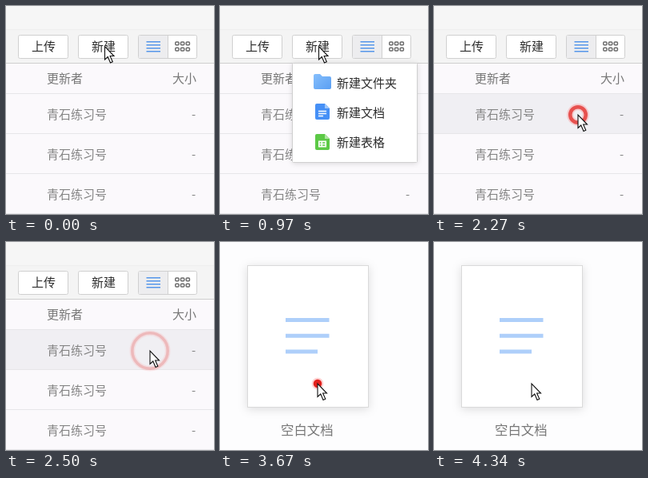
Write an HTML page that moves like this. It is 260 px wide and 260 px high and loops after 4.54 s.

```html
<!DOCTYPE html>
<html lang="zh">
<head>
<meta charset="utf-8">
<style>
html, body { margin: 0; width: 100%; height: 100%; overflow: hidden; background: #fdfdfe; }
svg { display: block; width: 100vw; height: 100vh; }
text { font: 15px "Noto Sans CJK SC", "Noto Sans CJK", sans-serif; fill: #777; }
.dark text { fill: #2c2c2c; }
.names text { fill: #858585; }
.btn { fill: #fff; stroke: #d0d0d0; }
.shadow { filter: drop-shadow(0 1px 3px #0002); }
</style>
</head>
<body>
<svg viewBox="0 0 260 260">
  <defs>
    <linearGradient id="folder" x2="1" y2="1">
      <stop stop-color="#86bffc"/><stop offset="1" stop-color="#5a9ff3"/>
    </linearGradient>
  </defs>
  <g id="list">
    <rect width="260" height="260" fill="#fbf9fc"/>
    <rect width="260" height="30" fill="#f6f6f6"/>
    <rect y="30" width="260" height="42" fill="#f4f4f4"/>
    <path d="M0 29.5H260" stroke="#eee"/>
    <path d="M0 71.5H260" stroke="#cfcfcf"/>
    <rect id="hoverRow" y="110" width="260" height="49" fill="#f0eff3"/>
    <path d="M0 109.5H260M0 159.5H260M0 209.5H260M0 259.5H260" stroke="#e7e6e9"/>
    <text x="51" y="96">更新者</text>
    <text x="208" y="96">大小</text>
    <g class="names" id="names"></g>

    <g class="dark">
      <rect class="btn" x="15.5" y="36.5" width="62" height="29" rx="2"/>
      <text x="32" y="56">上传</text>
      <rect class="btn" x="90.5" y="36.5" width="62" height="29" rx="2"/>
      <text x="107" y="56">新建</text>
    </g>
    <rect class="btn" x="165.5" y="36.5" width="73" height="29" rx="2"/>
    <path d="M166 37H202V65H166Z" fill="#ededef"/>
    <path d="M202.5 37V65" stroke="#d0d0d0"/>
    <path d="M175.5 44.7H193M175.5 48.7H193M175.5 52.7H193M175.5 56.7H193" stroke="#5596ea" stroke-width="1.6"/>
    <g id="grid" fill="none" stroke="#6c6c6c" stroke-width="1.5"></g>

    <g id="menu" class="dark">
      <rect class="btn shadow" x="90.5" y="71.5" width="156" height="124" rx="1"/>
      <rect id="hoverItem" x="91" width="155" height="37" fill="#f3f5f8"/>
      <g transform="translate(0 -1)">
        <path d="M117 88q0-2 2-2h6l3 3h9q2 0 2 2v12q0 2-2 2h-18q-2 0-2-2z" fill="url(#folder)"/>
        <path d="M119 125q0-2 2-2h10l6 6v12q0 2-2 2h-14q-2 0-2-2z" fill="#4690f6"/>
        <path d="M131 123v6h6z" fill="#9cc6fb"/>
        <path d="M123 132.5H133M123 135.5H133M123 138.5H129" stroke="#fff" stroke-width="1.4"/>
        <path d="M119 163q0-2 2-2h10l6 6v12q0 2-2 2h-14q-2 0-2-2z" fill="#5cc946"/>
        <path d="M131 161v6h6z" fill="#aee5a1"/>
        <rect x="123" y="169.5" width="10" height="8" fill="#fff"/>
        <path d="M124.5 172H126.5M128 172H131.5M124.5 175H126.5M128 175H131.5" stroke="#5cc946" stroke-width="1.5"/>
      </g>
      <text x="146" y="102">新建文件夹</text>
      <text x="146" y="139">新建文档</text>
      <text x="146" y="176">新建表格</text>
    </g>
  </g>

  <g id="blank">
    <rect width="260" height="260" fill="#fdfdfe"/>
    <g id="card">
      <rect x="33.5" y="29.5" width="151" height="177" fill="#fff" stroke="#dadada" style="filter:drop-shadow(0 2px 6px #0002)"/>
      <path d="M81 97.5H135.5M81 117.3H135.5M81 137H121" stroke="#aecffa" stroke-width="5"/>
      <text x="75" y="240.5" style="font-size:16.4px">空白文档</text>
    </g>
  </g>

  <g id="ring" fill="none">
    <circle id="glow" stroke="#f88" stroke-opacity=".4"/>
    <circle id="core" stroke="#e2201c"/>
  </g>
  <path id="cursor" d="M0 0V16.5L3.8 13L7 20.5L9.8 19.3L6.6 12H11.5Z" fill="#fff" stroke="#111" stroke-width="1.1"/>
</svg>
<script>
const LOOP = 4540, CLICK = 500;
const $ = id => document.getElementById(id);
const show = (id, on) => $(id).style.display = on ? '' : 'none';
const move = (id, x, y) => $(id).setAttribute('transform', `translate(${x} ${y})`);

$('names').innerHTML = [0, 1, 2].map(i =>
  `<text x="51" y="${141 + 50 * i}">青石练习号</text><text x="232" y="${140.5 + 50 * i}">-</text>`).join('');
$('grid').innerHTML = [0, 1, 2, 3, 4, 5].map(i =>
  `<rect x="${211.8 + i % 3 * 6.7}" y="${45 + (i > 2) * 7.3}" width="4.2" height="3.8" rx="1"/>`).join('');

const ease = (t, from, to) => {
  const p = Math.min(1, Math.max(0, (t - from) / (to - from)));
  return (1 - Math.cos(Math.PI * p)) / 2;
};
const mix = (a, b, p) => a + (b - a) * p;

function cursorAt(t) {
  const [from, to, p] = t < 2640
    ? [[123.5, 50.5], [180, 136], ease(t, 1155, 1670)]
    : [[189, 245], [122, 177], ease(t, 2960, 3400)];
  return [mix(from[0], to[0], p), mix(from[1], to[1], p)];
}

// A red dot that grows into a soft, fading ring
function drawRing(t, x, y) {
  const start = [470, 2140, 3670].find(s => t >= s && t < s + CLICK);
  const on = start !== undefined;
  show('ring', on);
  if (!on) return;
  const p = (t - start) / CLICK;
  move('ring', x, y);
  $('ring').setAttribute('opacity', 1 - p ** 1.5);
  $('core').setAttribute('stroke-opacity', 1 - p * .6);
  for (const [id, width] of [['glow', 9 - 3 * p], ['core', 5 - 2 * p]]) {
    $(id).setAttribute('r', 2.7 + 27 * p);
    $(id).setAttribute('stroke-width', width);
  }
}

function draw(t) {
  const [x, y] = cursorAt(t);
  const menuOpen = t >= 570 && t < 2240;
  show('list', t < 2640);
  show('menu', menuOpen);
  show('hoverRow', t >= 2240);
  const item = Math.floor((y - 78) / 37);
  show('hoverItem', menuOpen && item >= 0);
  $('hoverItem').setAttribute('y', 78 + 37 * Math.max(0, item));
  show('blank', t >= 2640);
  show('card', t >= 2670);
  move('card', ease(t, 2970, 3400), 0);
  drawRing(t, x, y);
  move('cursor', x, y);
}

const begin = performance.now();
function tick() {
  draw((performance.now() - begin) % LOOP);
  requestAnimationFrame(tick);
}
tick();
</script>
</body>
</html>
```
